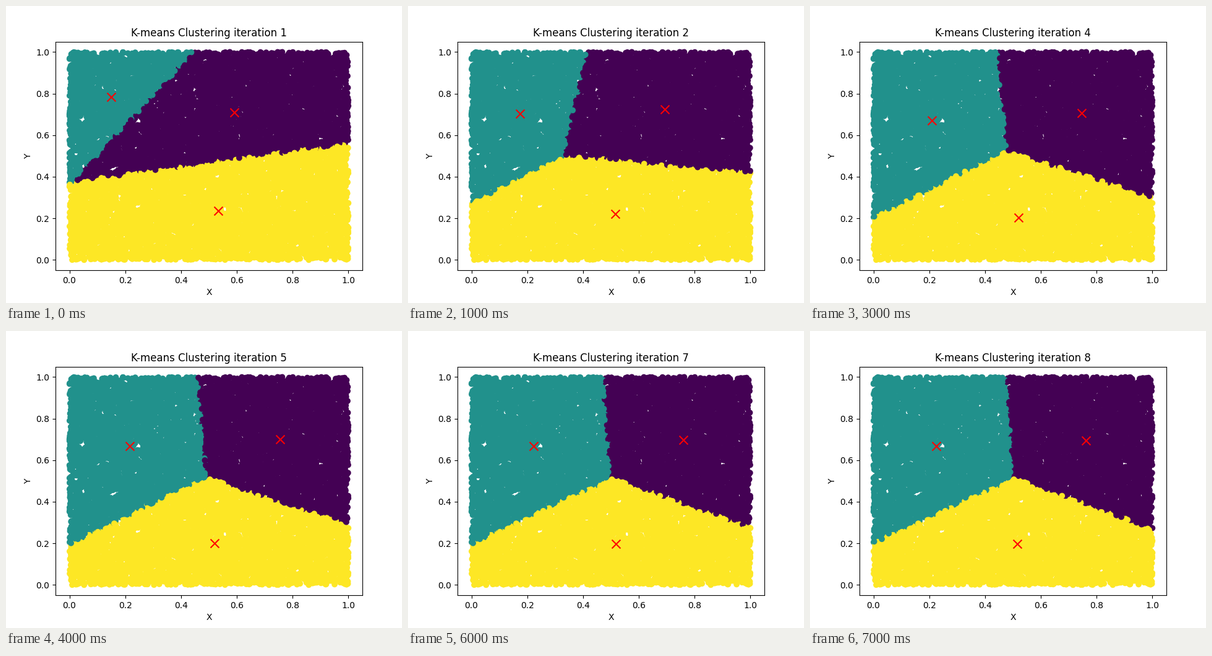
Animation of 640x480 px, one loop 8 s. Source, as a matplotlib script:

```python
import numpy as np
import matplotlib.pyplot as plt
from matplotlib.animation import FuncAnimation

STEPS = 8
CELLS = 20      # the unit square is split into CELLS x CELLS
PER_CELL = 28   # random points in each cell
COLORS = np.array(["#440154", "#21918c", "#fde725"])


def make_points():
    """Random cloud with an even share of points in every cell."""
    rng = np.random.default_rng(42)
    cells = np.indices((CELLS, CELLS)).reshape(2, -1).T
    corners = np.repeat(cells, PER_CELL, axis=0)
    pts = (corners + rng.random(corners.shape)) / CELLS
    rng.shuffle(pts)
    return pts


def start_centers():
    """Three points on a circle whose bisectors give the first partition."""
    hub, radius = np.array([0.011, 0.375]), 0.4
    upper, lower = np.arctan(1.435), np.arctan(0.187)
    teal = np.radians(80)
    purple = 2 * upper - teal
    yellow = 2 * lower - purple
    angles = np.array([purple, teal, yellow])
    return hub + radius * np.column_stack([np.cos(angles), np.sin(angles)])


def nearest(pts, centers):
    offsets = pts[:, None, :] - centers[None, :, :]
    return (offsets ** 2).sum(axis=2).argmin(axis=1)


def k_means(pts, centers):
    """Labels and updated centroids for every iteration."""
    history = []
    for _ in range(STEPS):
        labels = nearest(pts, centers)
        centers = np.array([pts[labels == k].mean(axis=0) for k in range(3)])
        history.append((labels, centers))
    return history


points = make_points()
history = k_means(points, start_centers())

fig, ax = plt.subplots(figsize=(6.4, 4.8), dpi=100)
ax.set_xlabel("X")
ax.set_ylabel("Y")
title = ax.set_title("")
cloud = ax.scatter(*points.T, c=COLORS[history[0][0]])
marks = ax.scatter(*history[0][1].T, marker="x", s=100, c="red")


def update(step):
    labels, centers = history[step]
    cloud.set_color(COLORS[labels])
    marks.set_offsets(centers)
    title.set_text(f"K-means Clustering iteration {step + 1}")
    return cloud, marks, title


anim = FuncAnimation(fig, update, frames=STEPS, interval=1000,
                     repeat=True, repeat_delay=0, blit=False)
plt.show()
```
